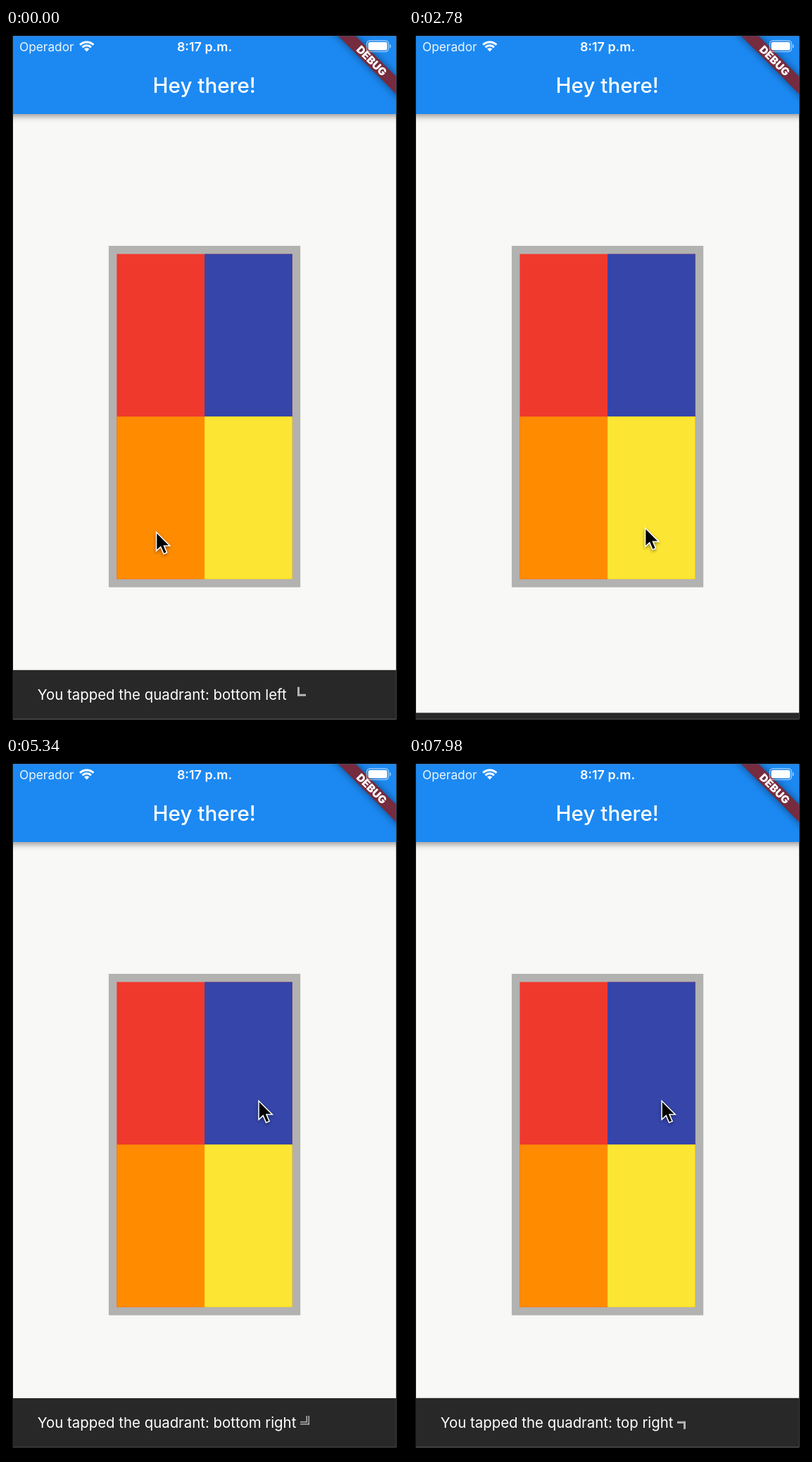
An HTML page with a canvas for the animation above (8 s loop, 564 px wide and 993 px high).

```html
<!DOCTYPE html>
<html lang="en">
<head>
<meta charset="utf-8">
<title>Quadrant taps</title>
<style>
  html, body { margin: 0; width: 100%; height: 100%; overflow: hidden; background: #000; }
  canvas { display: block; width: 564px; height: 993px; }
</style>
</head>
<body>
<canvas id="stage" width="564" height="993"></canvas>
<script>
const ctx = document.getElementById('stage').getContext('2d');
const LOOP = 8000;
const FONT = 'Inter, "Open Sans", sans-serif';
const SCREEN = { left: 9.9, top: 11.6, right: 554.3, bottom: 980.8 };
const BAR_HEIGHT = 70;
const SLIDE = 15;        // ticks for a snackbar to slide in or out
const EXIT_AGE = 58;     // ticks from entering to leaving
const CYCLE = 74;        // ticks between two snackbars

const MESSAGES = [
  { text: 'bottom left', mark: [[414, 24, 3, 13], [414, 34, 12, 3]] },
  { text: 'bottom right', mark: [[429.5, 25, 1.5, 12.5], [426.5, 25, 1.5, 9.5],
                                 [418, 36, 13, 1.5], [418, 33, 10, 1.5]] },
  { text: 'top right', mark: [[381, 33, 12, 3], [390, 33, 3, 11]] }
];

const clamp = v => Math.min(1, Math.max(0, v));

// Ticks come in groups of three lasting 20, 100 and 20 ms.
function tickAt(ms) {
  const rest = ms % 140;
  return 3 * Math.floor(ms / 140) + (rest < 20 ? 0 : rest < 120 ? 1 : 2);
}

// cubic-bezier(0.4, 0, 0.2, 1)
function fastOutSlowIn(x) {
  let lo = 0, hi = 1;
  for (let i = 0; i < 24; i++) {
    const s = (lo + hi) / 2, r = 1 - s;
    if (1.2 * r * r * s + 0.6 * r * s * s + s * s * s < x) lo = s; else hi = s;
  }
  return lo * lo * (3 - 2 * lo);
}

const easeOut = p => 1 - (1 - p) ** 3;
const easeInOut = p => p < 0.5 ? 4 * p ** 3 : 1 - 4 * (1 - p) ** 3;

function rect(color, x, y, w, h) {
  ctx.fillStyle = color;
  ctx.fillRect(x, y, w, h);
}

function label(text, x, y, size, weight, align = 'left') {
  ctx.font = `${weight} ${size}px ${FONT}`;
  ctx.textAlign = align;
  ctx.fillText(text, x, y);
}

function shadow(color, blur, dy = 0) {
  ctx.shadowColor = color;
  ctx.shadowBlur = blur;
  ctx.shadowOffsetY = dy;
}

function drawAppBar() {
  ctx.save();
  shadow('rgba(0,0,0,0.42)', 9, 3);
  rect('#1c89f2', 0, 0, 564, 122);
  ctx.restore();
  ctx.fillStyle = '#fff';
  label('Hey there!', 281.7, 91.5, 29.6, 500, 'center');
}

function drawRibbon() {
  ctx.save();
  ctx.translate(SCREEN.right, SCREEN.top);
  ctx.rotate(Math.PI / 4);
  ctx.save();
  shadow('rgba(0,0,0,0.5)', 11.5);
  rect('#762b3e', -70, 40.6, 140, 17.4);
  ctx.restore();
  ctx.fillStyle = '#fff';
  label('DEBUG', 0, 54.8, 15.3, 900, 'center');
  ctx.restore();
}

function drawWifi() {
  const x = 114.7, y = 33.5, a = Math.PI / 4;
  ctx.strokeStyle = '#fff';
  ctx.lineWidth = 3;
  for (const r of [13.6, 8.7]) {
    ctx.beginPath();
    ctx.arc(x, y, r, -3 * a, -a);
    ctx.stroke();
  }
  ctx.beginPath();
  ctx.moveTo(x, y);
  ctx.arc(x, y, 5.2, -3 * a, -a);
  ctx.fill();
}

function drawBattery() {
  ctx.strokeStyle = 'rgba(255,255,255,0.55)';
  ctx.lineWidth = 1.4;
  ctx.beginPath();
  ctx.roundRect(512.5, 18, 31, 15.6, 4.5);
  ctx.stroke();
  ctx.fillStyle = '#fff';
  ctx.beginPath();
  ctx.roundRect(514.6, 20.1, 26.8, 11.4, 2.6);
  ctx.fill();
  ctx.fillStyle = 'rgba(255,255,255,0.55)';
  ctx.fillRect(545, 23.5, 1.6, 4.6);
}

function drawStatus() {
  ctx.fillStyle = 'rgba(255,255,255,0.92)';
  label('Operador', 19, 33, 17.3, 400);
  ctx.fillStyle = '#fff';
  label('8:17 p.m.', 282, 33, 17.9, 600, 'center');
  drawWifi();
  drawBattery();
}

function drawQuadrants() {
  const left = 157.4, midX = 282.1, right = 406.7;
  const top = 320.6, midY = 551.2, bottom = 781.8;
  rect('#b2b2b1', 145.9, 309, 272.3, 484.4);
  rect('#ef392d', left, top, right - left, bottom - top);
  rect('#3545a9', midX, top, right - midX, bottom - top);
  rect('#ff8c00', left, midY, right - left, bottom - midY);
  rect('#fde633', midX, midY, right - midX, bottom - midY);
}

function drawSnackbar(tick) {
  const since = tick + 18;
  const message = MESSAGES[Math.floor(since / CYCLE)];
  const age = since % CYCLE;
  const leaving = age >= EXIT_AGE;
  const shown = leaving ? clamp(1 - (age - EXIT_AGE) / SLIDE) : clamp(age / SLIDE);
  if (shown === 0) return;
  const top = SCREEN.bottom - BAR_HEIGHT * fastOutSlowIn(shown);
  rect('#282828', 0, top, 564, BAR_HEIGHT);

  ctx.save();
  ctx.globalAlpha = leaving ? 1 : fastOutSlowIn(clamp((shown - 0.72) / 0.28));
  ctx.fillStyle = '#fff';
  label('You tapped the quadrant: ' + message.text, 44.7, top + 42, 20.4, 400);
  for (const [x, y, w, h] of message.mark) rect('#b4b4b4', x, top + y, w, h);
  ctx.restore();
}

function pointerAt(tick) {
  if (tick < 60) {
    const p = easeOut(clamp(tick / 36));
    return [213 + 122 * p, 714 - 6 * p - 3 * Math.sin(Math.PI * p)];
  }
  const p = easeInOut(clamp((tick - 62) / 42.7));
  return [335 + 23.5 * p + 14 * Math.sin(Math.PI * p), 708 - 220 * p];
}

const ARROW = new Path2D('M1.3 3V26L7 20.8L11.4 31L14.6 29.7L10.3 19.7H18Z');

function drawPointer(tick) {
  ctx.save();
  ctx.translate(...pointerAt(tick));
  ctx.save();
  shadow('rgba(0,0,0,0.4)', 4, 2);
  ctx.strokeStyle = '#fff';
  ctx.lineWidth = 3;
  ctx.stroke(ARROW);
  ctx.restore();
  ctx.fillStyle = '#000';
  ctx.fill(ARROW);
  ctx.restore();
}

function draw(ms) {
  const tick = tickAt(ms);
  rect('#000', 0, 0, 564, 993);
  ctx.save();
  ctx.beginPath();
  ctx.rect(SCREEN.left, SCREEN.top, SCREEN.right - SCREEN.left, SCREEN.bottom - SCREEN.top);
  ctx.clip();
  rect('#f8f8f6', 0, 0, 564, 993);
  drawAppBar();
  drawQuadrants();
  drawSnackbar(tick);
  drawRibbon();
  drawStatus();
  drawPointer(tick);
  ctx.restore();
}

const start = performance.now();
function loop() {
  draw((performance.now() - start) % LOOP);
  requestAnimationFrame(loop);
}
loop();
</script>
</body>
</html>
```
